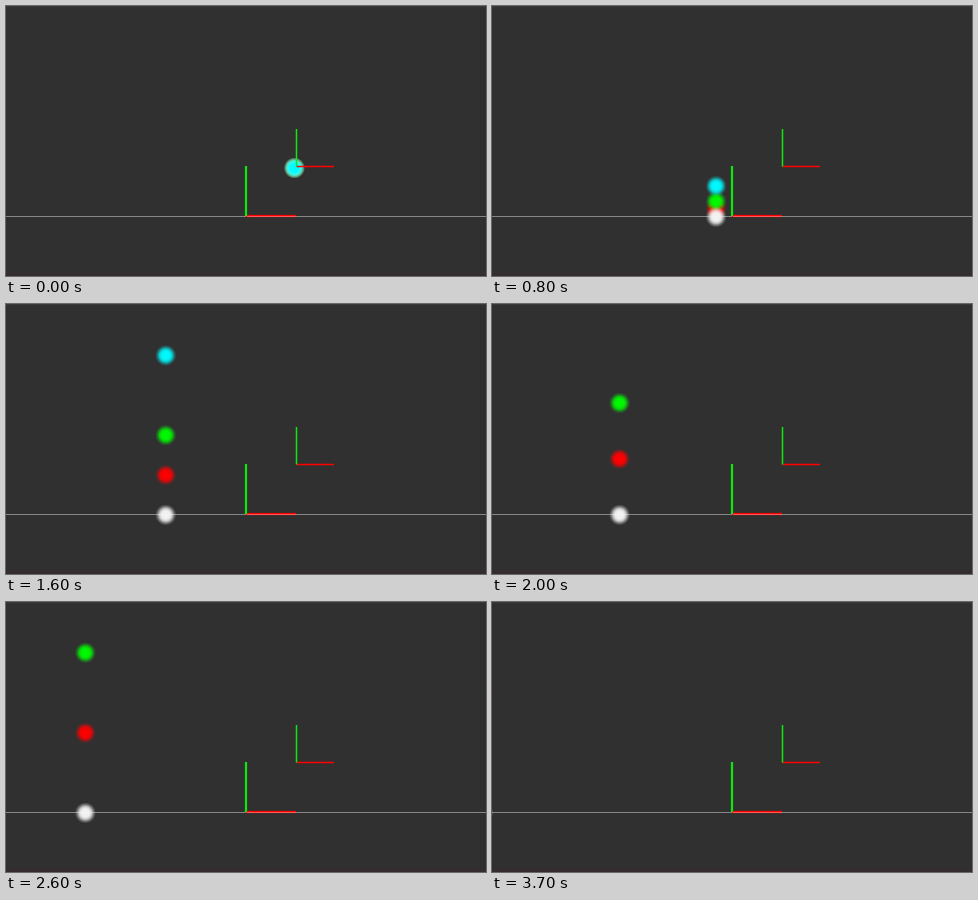
These frames come from a looping animation (480x270 px, 3.75 s). An HTML page with a canvas:

```html
<!DOCTYPE html>
<html lang="en">
<head>
<meta charset="utf-8">
<style>
html, body { margin: 0; width: 100%; height: 100%; overflow: hidden; background: #303030; }
canvas { display: block; }
</style>
</head>
<body>
<canvas id="stage" width="480" height="270"></canvas>
<script>
const ctx = document.getElementById('stage').getContext('2d');
const LOOP = 3750, STEP = 50;
const RADIUS = 10.5, SPEED = 0.0804;
const ORIGIN_X = 239.5, ORIGIN_Y = 210.9;

// Each ball follows y = x on the right and y = slope * x on the left.
const balls = [
  { rgb: '255,0,0', slope: -0.5 },
  { rgb: '0,250,0', slope: -1 },
  { rgb: '245,245,245', slope: 0 },
  { rgb: '0,250,255', slope: -2 }
];

function rect(color, x, y, w, h) {
  ctx.fillStyle = color;
  ctx.fillRect(x, y, w, h);
}

function drawBall(x, y, rgb) {
  const soft = ctx.createRadialGradient(x, y, 0, x, y, RADIUS);
  [[0, 1], [0.4, 0.97], [0.6, 0.77], [0.8, 0.32], [1, 0]].forEach(
    ([stop, alpha]) => soft.addColorStop(stop, `rgba(${rgb},${alpha})`));
  rect(soft, x - RADIUS, y - RADIUS, 2 * RADIUS, 2 * RADIUS);
}

function drawAxes(x, y, length, width) {
  rect('#f00', x, y - width / 2, length, width);
  rect('#12e612', x - width / 2, y - length, width, length);
}

function draw(time) {
  const t = Math.floor(time % LOOP / STEP) * STEP;
  const offset = 48.9 - SPEED * t;

  rect('#303030', 0, 0, 480, 270);
  rect('#3a3a3a', 0, 0, 480, 1);
  rect('#352c30', 0, 267, 480, 3);
  rect('#868686', 0, 210, 480, 1);

  for (const { rgb, slope } of balls) {
    const height = offset > 0 ? offset : slope * offset;
    drawBall(ORIGIN_X + offset, ORIGIN_Y - height, rgb);
  }

  drawAxes(240, 210, 50, 2.2);
  rect('#ff5a5a', 241, 210, 49, 1);
  drawAxes(290.5, 160.5, 37.5, 1.5);
}

const start = performance.now();
function tick() {
  draw(performance.now() - start);
  requestAnimationFrame(tick);
}
tick();
</script>
</body>
</html>
```
